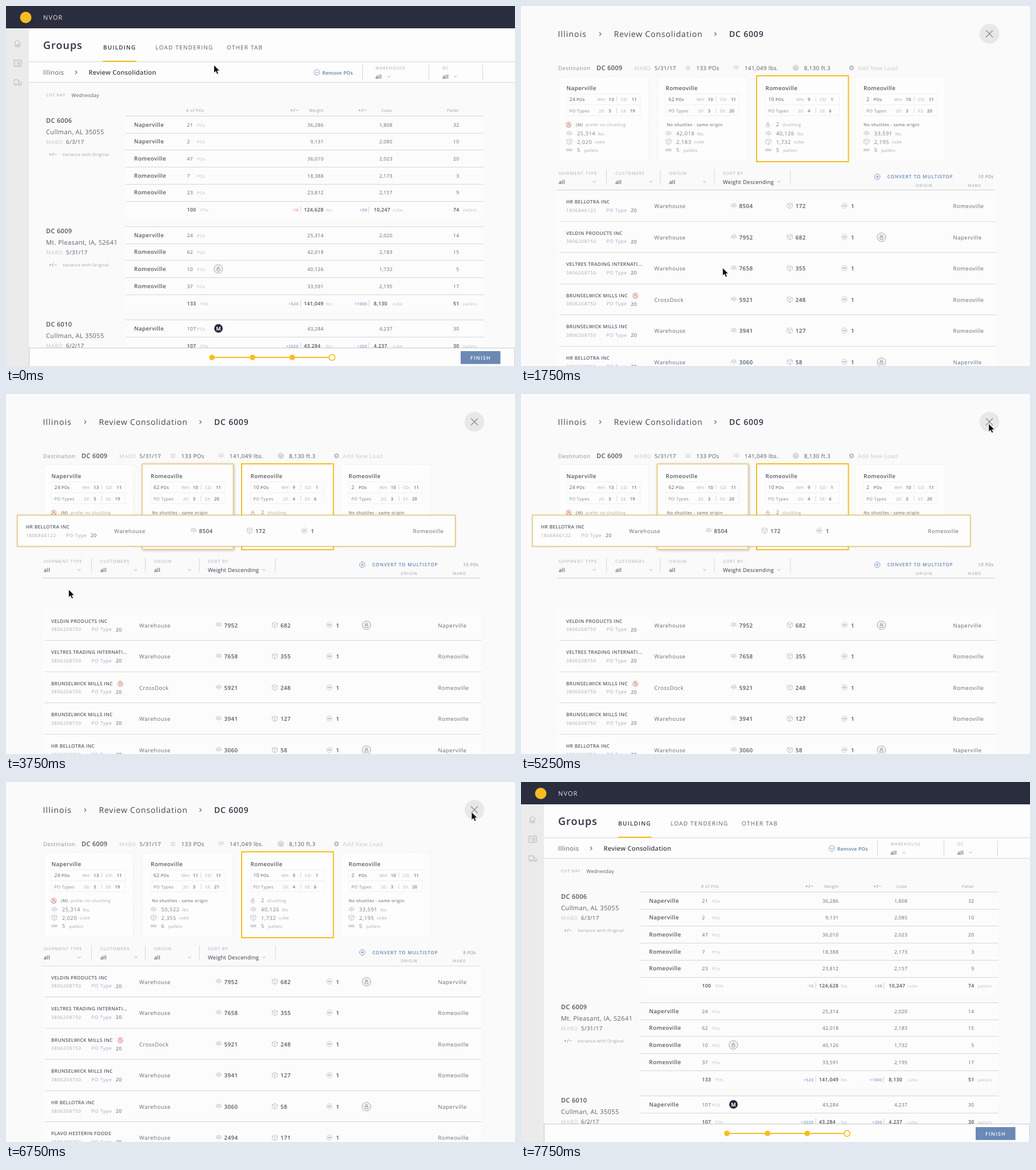
An HTML page for the animation above (8.25 s loop, 890 by 629 pixels).

```html
<!DOCTYPE html>
<html lang="en">
<head>
<meta charset="utf-8">
<title>Load building</title>
<style>
html, body { margin: 0; width: 100%; height: 100%; overflow: hidden; background: #fafafa; }
svg { display: block; width: 890px; height: 629px; }
text { font-family: "Open Sans", "Noto Sans", sans-serif; white-space: pre; text-rendering: geometricPrecision; }
.raised { filter: drop-shadow(1px 1px 2px rgba(0, 0, 0, .25)); }
.lifted { filter: drop-shadow(.5px .8px .8px rgba(0, 0, 0, .2)); }
</style>
</head>
<body>
<svg id="stage" viewBox="0 0 890 629" xmlns="http://www.w3.org/2000/svg"></svg>
<script>
const LOOP = 8250;
const INK = '#343848', GOLD = '#f5bd22', BLUE = '#6386ba', RULE = '#d6d6d6';

// size, letter spacing, weight, colour
const STYLES = {
  brand: [11, 1.1, 400, '#e6e7ea'],
  h1: [18, 1, 600, '#2c3040'],
  tab: [10, 1.2, 400, '#5b5e69'],
  tabOn: [10, 1.2, 600, INK],
  crumb: [11, .45, 400, '#555965'],
  crumbOn: [11, .25, 600, '#41444f'],
  remove: [8.5, .25, 600, '#5f7fae'],
  label: [7.4, .93, 400, '#a3abbd'],
  labelBold: [6.8, .9, 600, '#aab4ca'],
  select: [9.5, .25, 400, INK],
  day: [8.5, .25, 400, '#555965'],
  head: [7, .45, 400, '#9a9ca5'],
  sign: [8, .9, 600, '#8b8d96'],
  dc: [11, .35, 600, '#50535e'],
  city: [11, .4, 400, '#5d606a'],
  faint: [9.2, .85, 400, '#c6c8ce'],
  date: [9.8, .35, 400, '#585b66'],
  site: [9.8, .38, 600, '#555864'],
  num: [8.5, .35, 400, '#666973'],
  sum: [8.7, .3, 600, '#4c4f5a'],
  unit: [7, .45, 400, '#b9bbc2'],
  up: [7, .35, 600, '#7f9bca'],
  down: [7, .35, 600, '#df8d7d'],
  button: [8.7, 1.3, 600, '#fff'],
  badge: [9, 0, 700, '#fff'],
  trail: [14, .82, 400, '#434652'],
  trailWide: [14, 1.1, 400, '#434652'],
  trailOn: [14, .82, 600, '#2f3341'],
  dest: [9.5, .5, 400, '#8d9099'],
  add: [9.5, .5, 400, '#c6c8cd'],
  fact: [9.8, .4, 400, '#565964'],
  boxNum: [8.6, .3, 400, '#5b5e68'],
  boxPos: [7.3, .25, 600, '#777a84'],
  boxKey: [7.2, .4, 400, '#a6a8af'],
  boxVal: [7.7, .2, 600, '#73767f'],
  types: [7.5, .35, 400, '#82858e'],
  note: [7.3, .35, 400, '#a6a8af'],
  noteOn: [7.3, .4, 600, '#7f828b'],
  load: [9.2, .6, 400, '#7b7e87'],
  multi: [8.2, .84, 600, BLUE],
  count: [8, .5, 400, '#85888f'],
  firm: [8.3, .35, 600, '#5a5d68'],
  code: [8, .7, 400, '#a6a8ae'],
  poType: [8.2, .6, 400, '#9aa8c4'],
  twenty: [8.5, .4, 400, '#585b66'],
  cell: [9.5, .53, 400, '#666973'],
  qty: [9.8, .4, 600, '#555864']
};

const text = (x, y, str, style, extra = '') => {
  const [size, gap, weight, fill] = STYLES[style];
  return `<text x="${x}" y="${y}" font-size="${size}" letter-spacing="${gap}" font-weight="${weight}" fill="${fill}" ${extra}>${str}</text>`;
};
const textEnd = (x, y, str, style, extra = '') => text(x, y, str, style, 'text-anchor="end" ' + extra);
const rect = (x, y, w, h, fill, extra = '') => `<rect x="${x}" y="${y}" width="${w}" height="${h}" fill="${fill}" ${extra}/>`;
const disc = (x, y, r, fill, extra = '') => `<circle cx="${x}" cy="${y}" r="${r}" fill="${fill}" ${extra}/>`;
const path = (d, stroke, w = 1) => `<path d="${d}" fill="none" stroke="${stroke}" stroke-width="${w}"/>`;
const hline = (x1, x2, y, c = RULE) => path(`M${x1} ${y}H${x2}`, c);
const vline = (x, y1, y2, c = RULE) => path(`M${x} ${y1}V${y2}`, c);
const group = (id, body) => `<g id="${id}">${body}</g>`;
const caret = (x, y) => path(`M${x - 2.5} ${y - 1.2}l2.5 2.5 2.5-2.5`, '#8d9bb8', .9);
const chevron = (x, y, c = '#666973', s = 3) => path(`M${x - s / 2} ${y - s}l${s} ${s}-${s} ${s}`, c, 1.1);

const scale = (x, y, c = '#b4b6bc') =>
  path(`M${x - 4.5} ${y - 2.5}q4.5-3 9 0M${x} ${y - 4}V${y + 4.5}M${x - 5} ${y + 1}l2-3 2 3zM${x + 1} ${y + 1}l2-3 2 3z`, c, .7);
const cube = (x, y, c = '#b4b6bc', fill = 'none') =>
  `<path d="M${x} ${y - 5}l4.5 2.2v5.4L${x} ${y + 5}l-4.5-2.4v-5.4zM${x - 4.5} ${y - 2.8}l4.5 2.2 4.5-2.2M${x} ${y - .6}V${y + 5}" fill="${fill}" stroke="${c}" stroke-width=".8"/>`;
const pallet = (x, y) => rect(x - 4.5, y - 1.5, 9, 3, '#dcdde0', 'stroke="#b4b6bc" stroke-width=".7"');
const drop = (x, y, c) => disc(x, y - 2, 1.6, 'none', `stroke="${c}" stroke-width=".9"`) +
  `<ellipse cx="${x}" cy="${y + 1.6}" rx="3" ry="2.3" fill="none" stroke="${c}" stroke-width=".9"/>`;
const shuttle = (x, y) => disc(x, y, 7.5, '#f3f3f3', 'stroke="#a2a4a9" stroke-width="1"') + drop(x, y, '#85888e');
const banned = (x, y) => disc(x, y, 4.9, '#fcf1f0', 'stroke="#e0a39d" stroke-width=".8"') + drop(x, y, '#d98c85') +
  path(`M${x - 3.3} ${y - 3.3}l6.6 6.6`, '#d98c85', .8);
const ring = (x, y, sign) => disc(x, y, 4.8, 'none', `stroke="${BLUE}" stroke-width=".8"`) + path(sign, BLUE, .9);

// ---------- overview page ----------
const blocks = [
  { y: 192.5, dc: 'DC 6006', city: 'Cullman, AL 35055', date: '6/3/17',
    rows: [['Naperville', 21, '36,286', '1,808', 32], ['Naperville', 2, '9,131', '2,085', 10], ['Romeoville', 47, '36,010', '2,023', 20],
      ['Romeoville', 7, '18,388', '2,173', 3], ['Romeoville', 23, '23,812', '2,157', 9]],
    sum: [100, '-10', '124,628', '+39', '10,247', 74] },
  { y: 385.5, dc: 'DC 6009', city: 'Mt. Pleasant, IA, 52641', date: '5/31/17',
    rows: [['Naperville', 24, '25,314', '2,020', 14], ['Romeoville', 62, '42,018', '2,183', 15],
      ['Romeoville', 10, '40,126', '1,732', 5, 'shuttle'], ['Romeoville', 37, '33,591', '2,195', 17]],
    sum: [133, '+520', '141,049', '+1000', '8,130', 51] },
  { y: 548.5, dc: 'DC 6010', city: 'Cullman, AL 35055', date: '6/2/17',
    rows: [['Naperville', 107, '43,284', '4,237', 30, 'm']],
    sum: [107, '+2020', '43,284', '+200', '4,237', 30] }
];

function siteRow(y, [name, pos, weight, cubes, pallets, mark]) {
  const b = y + 18;
  const body = text(224, b, name, 'site') + text(316.5, b, pos, 'num') + text(334, b, 'POs', 'unit') +
    textEnd(555.5, b, weight, 'num', mark === 'm' ? 'class="swap"' : '') + textEnd(676, b, cubes, 'num') + textEnd(792.5, b, pallets, 'num') +
    (mark === 'shuttle' ? shuttle(371.3, y + 14.5) : '') +
    (mark === 'm' ? disc(371.5, y + 14.7, 7.5, '#25293a') + text(371.5, b, 'M', 'badge', 'text-anchor="middle"') : '');
  return mark === 'shuttle' ? group('hoverRow', body) : body;
}

function block({ y, dc, city, date, rows, sum }) {
  const end = y + rows.length * 29.7, b = end + 18.3;
  let s = rect(209, y, 626, end - y + 29, '#fcfcfc');
  s += text(70, y + 11.5, dc, 'dc') + text(70, y + 31, city, 'city') + text(70, y + 48, 'MABD', 'faint') + text(105, y + 48, date, 'date');
  s += text(75, y + 69.5, '+/−', 'sign') + text(99, y + 69.5, 'Variance with Original', 'head');
  rows.forEach((r, i) => s += siteRow(y + i * 29.7, r));
  for (let i = 0; i <= rows.length; i++) s += hline(209, 835, Math.round(y + i * 29.7 - .5) + .5);
  const [pos, dw, weight, dCube, cubes, pallets] = sum;
  s += text(316.5, b, pos, 'sum') + text(340, b, 'POs', 'unit') + textEnd(511.5, b, dw, dw[0] === '-' ? 'down' : 'up') + vline(515.5, end + 9, end + 21) +
    text(521, b, weight, 'sum', rows.length === 1 ? 'class="swap"' : '') + text(559.5, b, 'lbs.', 'unit') +
    textEnd(631.5, b, dCube, 'up') + vline(634.5, end + 9, end + 21) + text(643, b, cubes, 'sum') + text(676, b, 'cube', 'unit') +
    textEnd(792.5, b, pallets, 'sum') + text(799, b, 'pallets', 'unit');
  return s;
}

function sidebar() {
  const c = '#b5b6ba', wheel = x => disc(x, 137.5, 1.5, '#ebebeb', `stroke="${c}"`);
  return rect(0, 39, 40, 590, '#ebebeb') + path('M15 64l5-5 5 5M16 62v9h8v-9M19 71v-4h2.5v4', c) +
    path('M14 94.5h13v11h-13zM19 98h6M19 100.5h6M19 103h6M16 98h1M16 100.5h1M16 103h1', c) +
    path('M14 129h8v8h-8zM22 132h3.5l2 2.5v2.5h-5.5', c) + wheel(17) + wheel(24.5);
}

function overview() {
  let s = rect(0, 0, 890, 629, '#fafafa') + rect(40, 39, 850, 94, '#fdfdfd') + sidebar() + rect(0, 0, 890, 39, '#2a2d3d');
  s += disc(34.5, 20, 10, GOLD) + text(65, 24, 'NVOR', 'brand');
  s += text(65, 75, 'Groups', 'h1') + text(170, 76, 'BUILDING', 'tabOn') + text(261.5, 76, 'LOAD TENDERING', 'tab') + text(386, 76, 'OTHER TAB', 'tab');
  s += hline(40, 890, 97.5) + hline(40, 890, 133.5) + rect(169.5, 95.5, 58.5, 2.2, GOLD);
  s += text(65, 120, 'Illinois', 'crumb') + chevron(122.5, 116) + text(144.5, 120, 'Review Consolidation', 'crumbOn');
  s += ring(543.5, 116, 'M541 116h5') + text(553, 119.5, 'Remove POs', 'remove');
  s += [623.5, 739.5, 833.5].map(x => vline(x, 102, 129)).join('');
  s += text(646, 111, 'WAREHOUSE', 'label') + text(763, 111, 'DC', 'label') + text(646, 127, 'all', 'select') + text(763, 127, 'all', 'select') + caret(669.5, 123.5) + caret(786, 123);
  s += text(70, 158, 'CUT DAY', 'labelBold') + text(114.5, 158.5, 'Wednesday', 'day');
  s += text(315, 185, '# of POs', 'head') + text(497, 185, '+/−', 'sign') + text(530, 185, 'Weight', 'head') + text(616, 185, '+/−', 'sign') + text(656.5, 185, 'Cube', 'head') + text(771, 185, 'Pallet', 'head');
  s += blocks.map(block).join('') + group('hoverArrow', chevron(816, 459.5, '#8293bd', 2.8));
  s += rect(40.5, 597.5, 849, 32, '#fdfdfd', 'stroke="#c9c9c9"') + rect(360, 613, 206, 2, GOLD);
  s += [360, 431, 500.5].map(x => disc(x, 614, 4.8, GOLD)).join('') + disc(570, 614, 5.2, '#fff', `stroke="${GOLD}" stroke-width="1.7"`);
  return s + rect(795, 603, 69.5, 22.5, '#6a89b5') + text(812, 617.5, 'FINISH', 'button');
}

// ---------- detail page ----------
const plainFrame = (x, w) => rect(x, 123.5, w, 147.5, '#fdfdfd', 'stroke="#eee" stroke-dasharray="1.5 1"');
const activeFrame = rect(412, 122, 160.5, 150, '#fdfdfd', `stroke="${GOLD}" stroke-width="2"`);
const targetFrame = rect(238.3, 122.3, 159, 149, '#fdfdfd', 'stroke="#ecca76" stroke-width="1.5" class="raised"');

function card(frame, c) {
  const l = c.x;
  let s = frame + text(l, 146.5, c.site, 'site') + rect(l, 153.5, 129, 38, 'none', 'stroke="#efeff0" stroke-width=".8"') + hline(l, l + 129, 172.5, '#f0f0f1');
  s += text(l + 5, 166, c.pos, 'boxNum') + text(l + 17.5, 166, 'POs', 'boxPos') + text(l + 5, 186, 'PO Types', 'types');
  [['WH:', 'CD:', 54, 95, 114], ['20:', '33:', 56.5, 94.5, 111]].forEach(([a, b, xa, xb, xv], i) => {
    const y = 166 + i * 20;
    s += text(l + xa, y, a, 'boxKey') + text(l + 73.8, y, c.box[i * 2], 'boxVal') + vline(l + 88, y - 8, y + 1) +
      text(l + xb, y, b, 'boxKey') + text(l + xv, y, c.box[i * 2 + 1], 'boxVal');
  });
  if (c.note === 'M') s += banned(l + 4, 207.5) + text(l + 16.5, 210, '(M)', 'noteOn') + text(l + 33.5, 210, 'prefer no shuttling', 'note');
  else if (c.note) s += drop(l + 4, 207.5, '#a6a8ae') + text(l + 18.5, 210, c.note, 'load') + text(l + 29.5, 210, 'shuttling', 'note');
  else s += text(l + (l < 300 ? 2 : 0), 210, 'No shuttles - same origin', 'noteOn');
  const [lbs, cubes, pallets] = c.load;
  s += scale(l + 5, 223) + text(l + 18.5, 226, lbs, 'load') + text(l + 55, 225.5, 'lbs.', 'note');
  s += cube(l + 5, 237) + text(l + 18.5, 240.5, cubes, 'load') + text(l + 49.5, 240, 'cube', 'note');
  return s + pallet(l + 5, 251.5) + text(l + 18.5, 255, pallets, 'load') + text(l + 31, 254.5, 'pallets', 'note');
}

const cards = {
  first: { x: 79.5, site: 'Naperville', pos: '24', box: [13, 11, 5, 19], note: 'M', load: ['25,314', '2,020', 5] },
  before: { x: 253, site: 'Romeoville', pos: '62', box: [10, 11, 3, 20], load: ['42,018', '2,183', 5] },
  after: { x: 253, site: 'Romeoville', pos: '62', box: [11, 11, 3, 21], load: ['50,522', '2,355', 6] },
  active: { x: 427.5, site: 'Romeoville', pos: '10', box: [9, 1, 4, 6], note: '2', load: ['40,126', '1,732', 5] },
  last: { x: 599, site: 'Romeoville', pos: '2', box: [10, 11, 3, 20], load: ['33,591', '2,195', 5] }
};

const orders = [
  ['HR BELLOTRA INC', '1806846122', 'Warehouse', 8504, 172, 'Romeoville'],
  ['VELDIN PRODUCTS INC', '3806208750', 'Warehouse', 7952, 682, 'Naperville', 'shuttle'],
  ['VELTRES TRADING INTERNATI...', '3806208750', 'Warehouse', 7658, 355, 'Romeoville'],
  ['BRUNSELWICK MILLS INC', '3806208750', 'CrossDock', 5921, 248, 'Romeoville', 'banned'],
  ['BRUNSELWICK MILLS INC', '3806208750', 'Warehouse', 3941, 127, 'Romeoville'],
  ['HR BELLOTRA INC', '3806208750', 'Warehouse', 3060, 58, 'Naperville', 'shuttle'],
  ['PLAVO HESTERIN FOODS', '3806208750', 'Warehouse', 2494, 171, 'Romeoville']
];

function orderCells(y, [firm, code, origin, weight, cubes, place, mark]) {
  return text(79, y - 4.5, firm, 'firm') + text(79, y + 10.3, code, 'code') + text(149.5, y + 10.3, 'PO Type', 'poType') + text(192, y + 10.7, '20', 'twenty') +
    text(233, y + 3.5, origin, 'cell') + scale(372, y - .5) + text(381.5, y + 3.5, weight, 'qty') + cube(470, y - .5) + text(480, y + 3.5, cubes, 'qty') +
    disc(565.5, y - .5, 4.8, '#f4f4f5', 'stroke="#c6c8cd" stroke-width=".8"') + rect(562.5, y - 1.5, 6, 2, '#bfc1c6') + text(577, y + 3.5, '1', 'qty') +
    text(755.5, y + 3.5, place, 'cell') + (mark === 'shuttle' ? shuttle(630.3, y) : '') + (mark === 'banned' ? banned(200, y - 7) : '');
}
const orderRow = (y, order) => rect(64, y - 27.3, 767, 54.6, '#fcfcfc') + orderCells(y, order) + hline(67, 831, Math.round(y + 26) + .5);
const list = (top, from) => orders.slice(from).map((o, i) => orderRow(top + i * 54.55, o)).join('');

function filters() {
  const fields = [[66, 'SHIPMENT TYPE', 128], [165, 'CUSTOMERS', 227], [259, 'ORIGIN', 321], [353, 'SORT BY', 451]];
  return fields.map(([x, name, cx], i) =>
    text(x, 295, name, 'label') + text(x, 310.5, i < 3 ? 'all' : 'Weight Descending', 'select') + caret(cx, 307)).join('') +
    [149.5, 243.5, 338, 471].map(x => vline(x, 286, 311)).join('') +
    ring(623, 298.3, 'M620.5 298.3h5M623 295.8v5') + text(640.5, 301.4, 'CONVERT TO MULTISTOP', 'multi') +
    text(799, 301.3, '10 POs', 'count', 'id="count" font-style="italic"') + text(690, 315.7, 'ORIGIN', 'labelBold') + text(781, 315.7, 'MABD', 'labelBold');
}

function detail() {
  let s = rect(0, 0, 890, 629, '#fafafa');
  s += text(64.5, 54, 'Illinois', 'trailWide') + chevron(138.5, 49) + text(162.5, 54, 'Review Consolidation', 'trail') + chevron(340, 49) + text(364, 54, 'DC 6009', 'trailOn');
  s += disc(819, 48.5, 17.3, '#e8e8e8') + path('M813 42.5l12 12M825 42.5l-12 12', '#8a8a8c', 1.2);
  s += text(65, 111.5, 'Destination', 'dest') + text(132, 112, 'DC 6009', 'dc') + text(198, 111.5, 'MABD', 'faint') + text(233.5, 111.5, '5/31/17', 'date');
  s += path('M288 105.5h8M288 108h8M288 110.5h8', '#c6c8cd') + text(306.5, 111.5, '133 POs', 'fact') + scale(376.5, 108, '#c6c8cd') + text(391, 111.5, '141,049 lbs.', 'fact') +
    cube(480.5, 108, '#c6c8cd', '#d9dadd') + text(495, 111.5, '8,130 ft.3', 'fact') + disc(578, 108, 4.2, '#bcbec4') + path('M576 108h4M578 106v4', '#fff') + text(589, 111.5, 'Add New Load', 'add');

  s += card(plainFrame(65.5, 157.5), cards.first) + card(plainFrame(584.5, 157.5), cards.last) +
    group('before', card(plainFrame(238.5, 158), cards.before)) + group('after', card(plainFrame(238.5, 158), cards.after)) +
    group('target', card(targetFrame, cards.before)) + card(activeFrame, cards.active);

  s += group('filters', filters()) + hline(63, 829, 321.5, '#cfcfcf');
  s += group('head', orderRow(349.5, orders[0])) + group('rest', list(404.05, 1)) + group('moved', list(349, 1));
  return s + group('drag', rect(64, 322.3, 765.7, 54.4, '#fdfdfd', 'stroke="#e6bf5c" stroke-width="1.2" class="lifted"') + orderCells(349.7, orders[0]));
}

const arrow = '<path d="M0 0V14L3.2 11 5.5 16 8 15 5.8 10.2H10.2Z" fill="#0b0b0b" stroke="#fff" stroke-width=".8"/>';
document.getElementById('stage').innerHTML = group('overview', overview()) + group('detail', detail()) + group('cursor', arrow);

// ---------- timeline ----------
// time, x, y of the pointer tip
const stops = [
  [0, 363.5, 103], [250, 361, 455], [500, 362, 456], [750, 353, 457], [1000, 352.5, 457.5], [2250, 159, 457], [2500, 28, 427],
  [2750, 99, 341], [3750, 109.5, 341.5], [4000, 113, 342], [4250, 622, 191], [4500, 786, 77], [5000, 811.5, 59],
  [5250, 817.8, 52], [6250, 816.5, 52.5], [6500, 814, 52.5], [7500, 812.5, 52]
];
const el = id => document.getElementById(id);
const show = (id, on) => el(id).setAttribute('display', on ? 'inline' : 'none');
const swaps = document.querySelectorAll('.swap');
let last = '';

function draw(t) {
  const on = (a, b) => t >= a && t < b;
  const [at, x, y] = stops.filter(s => s[0] <= t).pop();
  const hover = on(1500, 1750), inside = on(1750, 7500), lifted = on(3000, 6000), over = on(3750, 6000);
  const done = t >= 6000, counted = t >= 6750, pointer = t < 7750;
  const key = [at, hover, inside, lifted, over, done, counted, pointer].join();
  if (key === last) return;
  last = key;
  show('overview', !inside);
  show('detail', inside);
  show('hoverArrow', hover);
  el('hoverRow').setAttribute('opacity', hover ? .55 : 1);
  swaps.forEach(n => n.textContent = hover ? '41,284' : '43,284');
  show('before', !over && !done);
  show('target', over);
  show('after', done);
  show('head', !lifted && !done);
  show('rest', !done);
  show('moved', done);
  show('drag', lifted);
  el('drag').setAttribute('transform', over ? 'translate(-44 -110.5)' : '');
  el('filters').setAttribute('transform', done ? 'translate(0 -.6)' : '');
  el('count').textContent = counted ? '9 POs' : '10 POs';
  el('cursor').setAttribute('transform', `translate(${x} ${y})`);
  show('cursor', pointer);
}

const start = performance.now();
function tick() {
  draw((performance.now() - start) % LOOP);
  requestAnimationFrame(tick);
}
tick();
</script>
</body>
</html>
```
